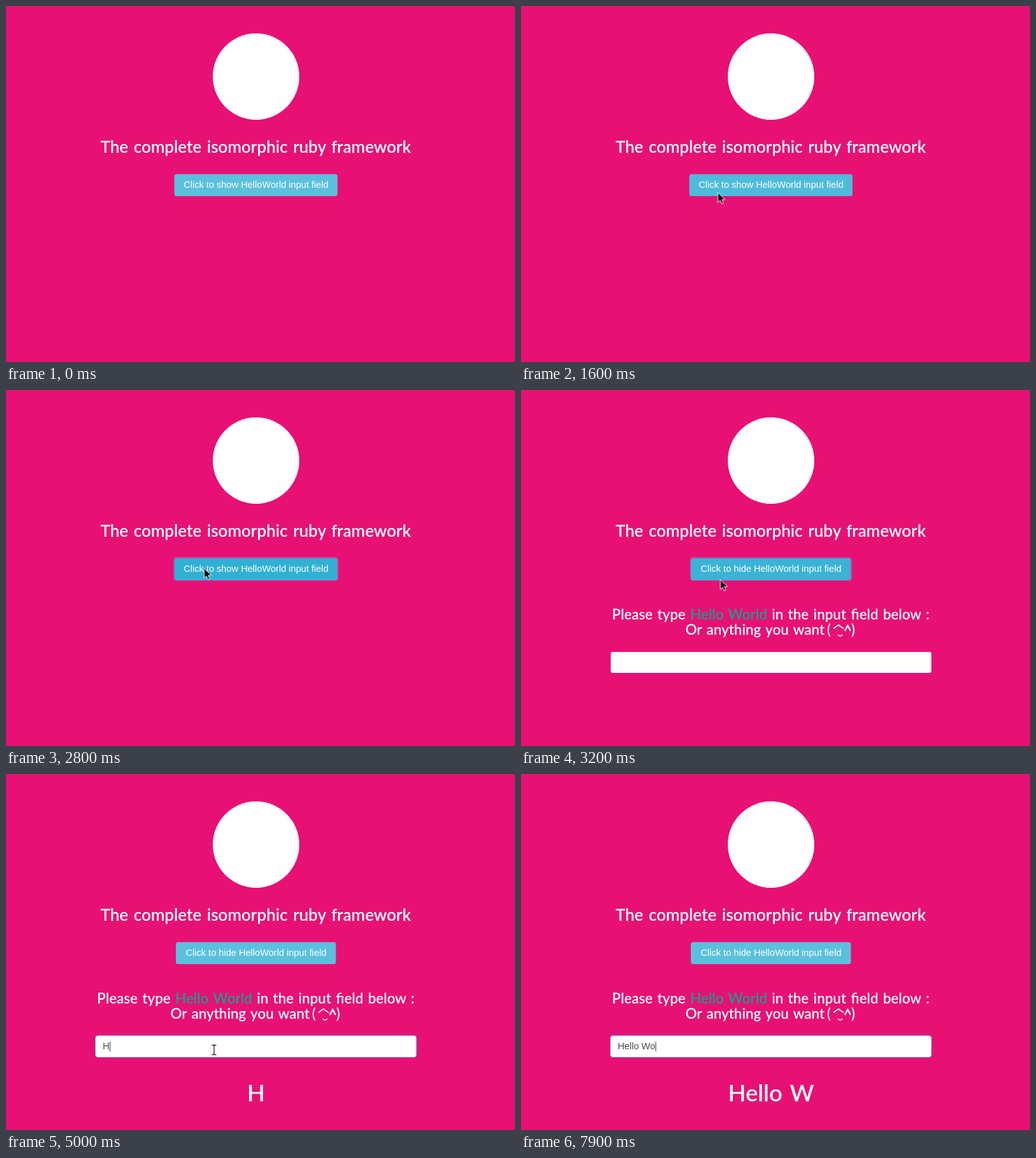
These frames come from a looping animation (800x560 px, 8 s). An HTML page:

```html
<!DOCTYPE html>
<html lang="en">
<head>
<meta charset="utf-8">
<title>Hello World demo</title>
<style>
  html, body { margin: 0; width: 100%; height: 100%; overflow: hidden; background: #e81074; }
  svg { display: block; }
  text { white-space: pre; }
  .head { font-family: Lato, "Open Sans", sans-serif; font-weight: 600; fill: #fff; word-spacing: .08em; }
  .mid { text-anchor: middle; }
  .ui { font: 14.6px "Liberation Sans", Arial, sans-serif; }
  .btn text { fill: #fff; }
  .ring { fill: none; stroke: #8fa3d6; stroke-dasharray: 1 1; }

  .anim { animation: 8s linear infinite; }
  .btn rect.face { fill: #5bc0de; }
  #show { animation-name: show; }
  #show .face { animation-name: hover; }
  #show .ring { animation-name: press; }
  #hide, #panel { animation-name: reveal; }
  #hide .face { animation-name: leave; }
  #hide .ring { animation-name: blur; }
  #glow { animation-name: focus; }
  #mouse { animation-name: move; }
  #arrow { animation-name: arrow; }
  #beam { animation-name: beam; }

  @keyframes show { 0%, 36.87% { opacity: 1 } 36.88%, 100% { opacity: 0 } }
  @keyframes reveal { 0%, 36.87% { opacity: 0 } 36.88%, 100% { opacity: 1 } }
  @keyframes hover { 0%, 18.75% { fill: #5bc0de } 23%, 100% { fill: #31b0d5 } }
  @keyframes leave { 0%, 39.5% { fill: #31b0d5 } 42%, 100% { fill: #5bc0de } }
  @keyframes press { 0%, 28.11% { opacity: 0 } 28.12%, 100% { opacity: 1 } }
  @keyframes blur { 0%, 48.11% { opacity: 1 } 48.12%, 100% { opacity: 0 } }
  @keyframes focus { 0%, 48.12% { opacity: 0 } 51%, 100% { opacity: 1 } }
  @keyframes arrow { 0%, 41.24% { opacity: 1 } 41.25%, 100% { opacity: 0 } }
  @keyframes beam { 0%, 41.24% { opacity: 0 } 41.25%, 100% { opacity: 1 } }
  @keyframes move {
    0%, 3.74% { opacity: 0; transform: translate(240px, 358px) }
    3.75% { opacity: 1; transform: translate(240px, 358px) }
    11.25% { transform: translate(298px, 331px) }
    19.5%, 20.5% { transform: translate(309.5px, 293.5px) }
    28.7%, 38.5% { transform: translate(311.5px, 280.5px); animation-timing-function: ease-in-out }
    44.9% { transform: translate(327px, 434px) }
    64.99% { opacity: 1; transform: translate(327px, 434px) }
    65%, 100% { opacity: 0; transform: translate(327px, 434px) }
  }
</style>
</head>
<body>
<svg width="800" height="560" viewBox="0 0 800 560">
  <rect width="800" height="560" fill="#e81074"/>
  <rect width="800" height="1" fill="#e5195f"/>
  <circle cx="393" cy="111" r="68" fill="#fff"/>
  <text class="head mid" x="392.5" y="231" font-size="26">The complete isomorphic ruby framework</text>

  <g id="show" class="btn anim">
    <rect class="face anim" x="264.5" y="264.5" width="256.5" height="34.5" rx="3.5"/>
    <rect class="ring anim" x="263.5" y="263.5" width="258.5" height="36" rx="3"/>
    <text class="ui mid" x="393" y="286">Click to show HelloWorld input field</text>
  </g>
  <g id="hide" class="btn anim">
    <rect class="face anim" x="267" y="264.5" width="251.5" height="34.5" rx="3.5"/>
    <rect class="ring anim" x="266.5" y="263.5" width="253" height="36" rx="3"/>
    <text class="ui mid" x="393" y="286">Click to hide HelloWorld input field</text>
  </g>

  <g id="panel" class="anim">
    <text class="head mid" x="392.5" y="361" font-size="22.4">Please type <tspan fill="#1d9c8c">Hello World</tspan> in the input field below :</text>
    <g class="head" font-size="22.4">
      <text x="258.5" y="385">Or anything you want</text>
      <text x="481" y="385" style="font-weight:400">(</text>
      <text x="519" y="385">)</text>
    </g>
    <g fill="none" stroke="#fff">
      <path stroke-width="1.6" d="M491 375.5l8-6 8 6M498 385q3.5 4 7 0"/>
      <path stroke-width="2.4" d="M509 379l4.5-8.5 4.5 8.5"/>
    </g>
    <rect x="141" y="412" width="504" height="33" rx="3" fill="#fff"/>
    <rect id="glow" class="anim" x="140.5" y="411.5" width="504.5" height="34" rx="3.5" fill="none" stroke="#66afe9"/>
    <text id="field" class="ui" x="152" y="433" fill="#484848"></text>
    <rect id="caret" y="421" width="1" height="15.5" fill="#333"/>
    <text id="echo" class="head mid" x="393" y="515" font-size="36.5"></text>
  </g>

  <g id="mouse" class="anim">
    <path id="arrow" class="anim" d="M0 0V15.5l3.6-3.4 2.4 5.6 2.6-1.1-2.4-5.5h4.9z" fill="#000" stroke="#fff"/>
    <path id="beam" class="anim" d="M-3.5-7.5h2.5l1 1 1-1h2.5M0-6.5v13M-3.5 7.5h2.5l1-1 1 1h2.5" fill="none" stroke="#3a1a2c" stroke-width="1.3"/>
  </g>
</svg>
<script>
  const LOOP = 8000, FOCUS = 3750, BLINK = 680, LAG = 160;
  const phrase = "Hello Wo";
  const keys = [4700, 5200, 5480, 6050, 7100, 7350, 7600, 7850];
  const [field, echo, caret] = ["field", "echo", "caret"].map(id => document.getElementById(id));

  const typed = t => phrase.slice(0, keys.filter(k => k <= t).length);
  const setText = (el, s) => { if (el.textContent !== s) el.textContent = s; };

  function draw(now) {
    const t = now % LOOP;
    const s = typed(t);
    setText(field, s);
    setText(echo, typed(t - LAG));

    // each key press restarts the blink
    const since = t - (s ? keys[s.length - 1] : FOCUS);
    const on = since >= 0 && since % (2 * BLINK) < BLINK;
    caret.setAttribute("x", 152.4 + (s ? field.getComputedTextLength() : 0));
    caret.setAttribute("opacity", on ? 1 : 0);
  }

  function tick() {
    draw(performance.now());
    requestAnimationFrame(tick);
  }
  tick();
</script>
</body>
</html>
```
